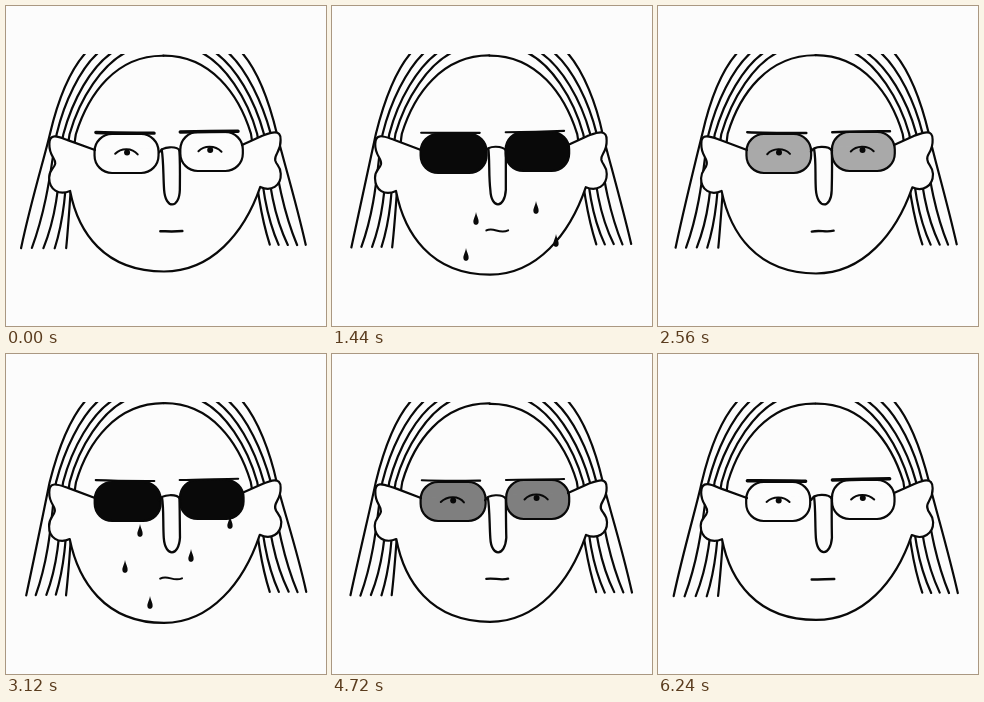
These frames come from a looping animation (320x320 px, 6320 ms). An HTML page with a canvas:

```html
<!DOCTYPE html>
<html lang="en">
<head>
<meta charset="utf-8">
<title>Glasses</title>
<style>
html, body { margin: 0; width: 100%; height: 100%; overflow: hidden; background: #fcfcfc; }
canvas { display: block; width: 320px; height: 320px; }
</style>
</head>
<body>
<canvas id="stage" width="320" height="320"></canvas>
<script>
const ctx = document.getElementById('stage').getContext('2d');
const PAPER = '#fcfcfc', INK = '#090909';
const STEP = 80, LOOP = 6320, CYCLE = 26;

let seed = 1;
function rnd() {
  seed = (seed * 16807) % 2147483647;
  return seed / 2147483647;
}
const wob = a => (rnd() - 0.5) * 2 * a;
const mix = (a, b, k) => a + (b - a) * k;
const clamp = v => Math.max(0, Math.min(1, v));
const flip = (pts, width, lift = 0) => pts.map(([x, y]) => [width - x, y - lift]);
const shaky = pts => pts.map(([x, y]) => [x + wob(0.4), y + wob(0.4)]);

// Adds chained cubic curves: a start, then two handles and an end for each piece.
function trace(pts) {
  ctx.lineTo(...pts[0]);
  for (let i = 1; i + 2 < pts.length; i += 3) {
    ctx.bezierCurveTo(...pts[i], ...pts[i + 1], ...pts[i + 2]);
  }
}

function stroke(width) {
  ctx.lineWidth = width;
  ctx.stroke();
}

function curve(pts, width = 2.2) {
  ctx.beginPath();
  trace(shaky(pts));
  stroke(width);
}

function line(x1, y1, x2, y2, width) {
  curve([[x1, y1], [mix(x1, x2, 0.3), mix(y1, y2, 0.3)], [mix(x1, x2, 0.7), mix(y1, y2, 0.7)], [x2, y2]], width);
}

// k runs from the outermost strand (0) to the hairline (1).
function strand(k, tip, tipY) {
  return [
    [mix(79, 132, k), 47], [mix(63, 108, k), mix(66, 56, k)], [mix(51, 82, k), mix(98, 88, k)],
    [mix(44, 70, k), 128], [mix(39, 66, k), 150], [mix(tip + 10, 65, k), 195], [tip, tipY]
  ];
}

function hair(breath) {
  const left = 15 + 5 * breath, right = 300 + wob(1.5), y = 242 - breath;
  ctx.save();
  ctx.beginPath();
  ctx.rect(0, 48, 320, 272);
  ctx.clip();
  for (let i = 0; i <= 4; i++) {
    const k = i / 4;
    const l = strand(k, mix(left, 60, k), y);
    const r = strand(k, 315 - mix(right, 264, k), y - 3);
    if (k === 1) {
      for (const s of [l, r]) s.splice(0, 2, [157.5, 49.5], [110, 49]);
    }
    curve(l);
    curve(flip(r, 315));
  }
  ctx.restore();
}

function head(breath) {
  const chin = 265.5 + 3.5 * breath;
  const ear = [[62, 134], [54, 131], [43, 126], [43, 138], [43, 150], [50, 152], [49, 158],
    [48, 163], [43, 164], [43, 172], [43, 184], [53, 190], [64, 185]];
  const left = shaky(ear), right = shaky(flip(ear, 318, 4));
  const jaw = [left[12], [72, 226], [98, chin], [158, chin], [205, chin], [238, 228], right[12]];
  ctx.beginPath();
  ctx.moveTo(89, 144);
  trace(left);
  trace(jaw);
  trace([...right].reverse());
  ctx.lineTo(236, 139);
  ctx.fillStyle = PAPER;
  ctx.fill();
  stroke(2.2);
}

function eye(x, y) {
  curve([[x - 12, y + 1], [x - 6, y - 5], [x + 5, y - 5.5], [x + 11, y + 1]], 2);
  ctx.beginPath();
  ctx.arc(x, y - 0.5, 3, 0, 7);
  ctx.fillStyle = INK;
  ctx.fill();
}

function lens(x, y, w, tint) {
  ctx.beginPath();
  ctx.roundRect(x + wob(0.4), y, w, 39, 17.5);
  ctx.globalAlpha = tint;
  ctx.fillStyle = INK;
  ctx.fill();
  ctx.globalAlpha = 1;
  stroke(2.2);
}

function glasses(tint) {
  lens(88.5, 128, 64 + 2 * tint, tint);
  lens(174, 126, 62.5 + tint, tint);
  curve([[153, 146], [156, 139.5], [171, 139.5], [174, 145]]);
}

function nose() {
  curve([[156, 143], [158, 155], [157, 170], [158, 184],
    [159, 203], [173, 203], [174, 184], [174, 170], [174, 157], [173.5, 144]], 2.3);
}

function brows(tint) {
  const width = mix(3.4, 2.1, clamp(tint * 2));
  line(89.5, 126.5, 148, 127, width);
  line(174, 126, 232, 125, width);
}

function mouth(tint) {
  const y = 225.5 - tint, bend = 4 * tint;
  curve([[154, y], [162, y - bend], [167, y + bend], [176, y - 0.5]], mix(2.5, 2, tint));
}

function tear(x, y) {
  ctx.beginPath();
  ctx.moveTo(x, y - 7);
  ctx.bezierCurveTo(x + 1, y - 2, x + 3, y, x + 2.6, y + 3.4);
  ctx.bezierCurveTo(x + 2, y + 6.6, x - 2.2, y + 6.6, x - 2.6, y + 3.2);
  ctx.bezierCurveTo(x - 2.8, y, x - 0.8, y - 2, x, y - 7);
  ctx.fillStyle = INK;
  ctx.fill();
}

// One new tear per step under each lens, falling at a steady pace.
function weep(p, first, xs, top, fall) {
  for (let born = first; born <= Math.min(p, 16); born++) {
    const y = top + fall * (p - born);
    if (y < 255) tear(xs[(born - first) % xs.length], y);
  }
}

function draw(p) {
  const tint = clamp(Math.min((p - 3) * 0.17, (22 - p) * 0.22));
  const breath = Math.sin(Math.PI * p / CYCLE);
  seed = 977 * (p + 3);
  for (let i = 0; i < 4; i++) rnd();

  ctx.fillStyle = PAPER;
  ctx.fillRect(0, 0, 320, 320);
  ctx.strokeStyle = INK;
  ctx.lineCap = ctx.lineJoin = 'round';

  hair(breath);
  head(breath);
  eye(121 + wob(0.5), 147);
  eye(204.5 + wob(0.5), 144.5);
  glasses(tint);
  nose();
  brows(tint);
  mouth(tint);
  weep(p, 10, [144, 119, 134], 177, 36);
  weep(p, 11, [185, 224, 204], 169, 33);
}

let shown = -1;
const start = performance.now();
function tick() {
  const n = Math.floor(((performance.now() - start) % LOOP) / STEP);
  const p = n ? (n - 1) % CYCLE : 0;
  if (p !== shown) draw(shown = p);
  requestAnimationFrame(tick);
}
tick();
</script>
</body>
</html>
```
